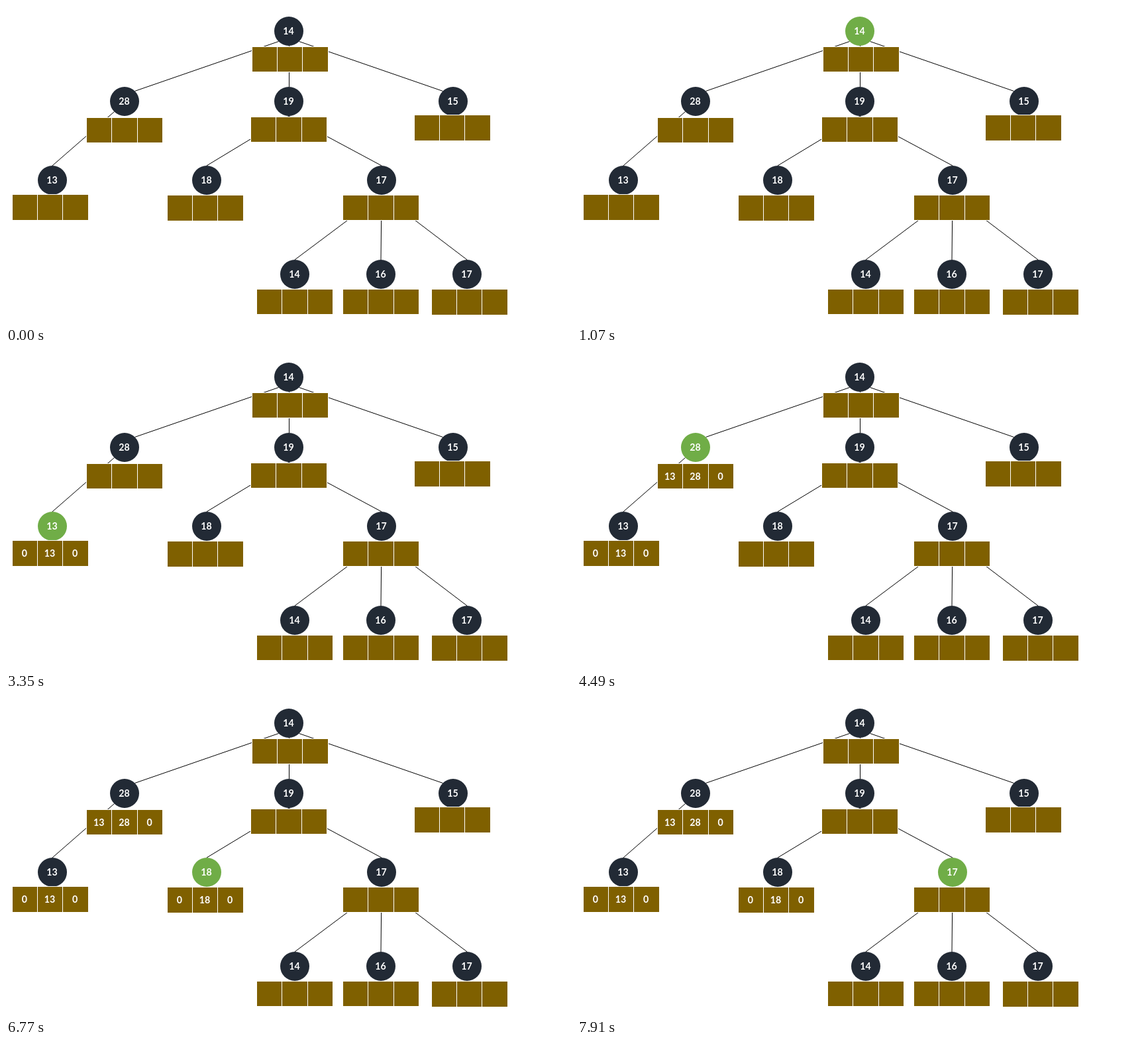
Animation of 853 by 480 pixels, one loop 8000 ms. Source, as an HTML page:

```html
<!DOCTYPE html>
<html lang="en">
<head>
<meta charset="utf-8">
<title>Tree traversal</title>
<style>
  html, body { margin: 0; width: 100%; height: 100%; overflow: hidden; background: #fff; }
  svg { display: block; width: 853px; height: 480px; }
  text { font: bold 14.2px Lato, Carlito, sans-serif; fill: #fff; text-anchor: middle; }
</style>
</head>
<body>
<svg id="stage" viewBox="0 0 853 480"></svg>
<script>
const DARK = '#222a35', GREEN = '#70ad47', GOLD = '#7f6000';
const LOOP = 8000, FIRST_STEP = 1070, STEP = 1140;
const RADIUS = 22, CELL = 38.35, BOX_HEIGHT = 37.5;
const LEVEL_Y = [38, 144, 263, 405];
const TOP = -90, BOTTOM = 90, LOWER_LEFT = 135, LOWER_RIGHT = 45;
const stage = document.getElementById('stage');

// x is the circle's centre; boxX and boxY are the corner of its three cells.
const node = (label, x, boxX, boxY, ...children) => ({ label, x, boxX, boxY, children });

const root = node(14, 427, 372, 62,
  node(28, 179, 122.5, 169,
    node(13, 70, 10, 285.5)),
  node(19, 427, 370.5, 168,
    node(18, 303, 244, 286.5),
    node(17, 567, 509.5, 286,
      node(14, 436, 379.5, 428),
      node(16, 566, 509.5, 428),
      node(17, 696, 643, 428.5))),
  node(15, 675, 617, 165.5));

function add(tag, attrs, content = '') {
  const el = document.createElementNS('http://www.w3.org/2000/svg', tag);
  for (const key in attrs) el.setAttribute(key, attrs[key]);
  el.textContent = content;
  return stage.appendChild(el);
}

function rim(n, degrees) {
  const angle = degrees * Math.PI / 180;
  return [n.x + RADIUS * Math.cos(angle), n.y + RADIUS * Math.sin(angle)];
}

// Wide branches leave the circle diagonally; the root's also arrive diagonally.
function drawEdge(parent, child) {
  const side = Math.sign(child.x - parent.x);
  const diagonal = side && (parent === root || parent.children.length === 1);
  const from = !diagonal ? BOTTOM : side < 0 ? LOWER_LEFT : LOWER_RIGHT;
  const to = diagonal && parent === root ? from - 180 : TOP;
  // Opposite corners face each other once mirrored to the upper half.
  const end = to === TOP ? TOP : side < 0 ? -LOWER_RIGHT : -LOWER_LEFT;
  const shift = side ? 0 : 0.5;
  const [x1, y1] = rim(parent, from), [x2, y2] = rim(child, end);
  add('line', { x1: x1 + shift, y1, x2: x2 + shift, y2, stroke: '#000' });
}

function drawEdges(n, level = 0) {
  n.y = LEVEL_Y[level];
  for (const child of n.children) {
    drawEdges(child, level + 1);
    drawEdge(n, child);
  }
}

// Cell borders snap to whole pixels.
function drawNode(n) {
  n.circle = add('circle', { cx: n.x, cy: n.y, r: RADIUS });
  add('text', { x: n.x - 0.5, y: n.y + 5 }, n.label);
  const border = i => Math.floor(n.boxX - 1 + i * CELL) + 0.5;
  const top = Math.floor(n.boxY) - 0.5;
  const height = Math.floor(n.boxY + BOX_HEIGHT) + 0.5 - top;
  for (let i = 0; i < 3; i++)
    add('rect', {
      x: border(i), y: top, width: border(i + 1) - border(i), height,
      fill: GOLD, stroke: '#fff'
    });
  n.children.forEach(drawNode);
}

// Each node is highlighted on entry, and again once its children are done.
const steps = [{}];
function traverse(n) {
  if (n.children.length) steps.push({ node: n });
  n.children.forEach(traverse);
  const [left, right] = n.children;
  steps.push({ node: n, values: [left ? left.label : 0, n.label, right ? right.label : 0] });
}

drawEdges(root);
drawNode(root);
traverse(root);
steps.length = Math.ceil((LOOP - FIRST_STEP) / STEP) + 1;
for (const step of steps)
  step.texts = (step.values || []).map((value, i) =>
    add('text', { x: step.node.boxX + 17.8 + i * 38.2, y: step.node.boxY + 23.6 }, value));

function draw(time) {
  const current = Math.max(0, 1 + Math.floor((time % LOOP - FIRST_STEP) / STEP));
  steps.forEach((step, i) => {
    if (step.node) step.node.circle.setAttribute('fill', DARK);
    for (const text of step.texts)
      text.setAttribute('visibility', i <= current ? 'visible' : 'hidden');
  });
  const active = steps[current].node;
  if (active) active.circle.setAttribute('fill', GREEN);
}

for (const circle of stage.querySelectorAll('circle')) circle.setAttribute('fill', DARK);
const start = performance.now();
function tick() {
  draw(performance.now() - start);
  requestAnimationFrame(tick);
}
draw(0);
requestAnimationFrame(tick);
</script>
</body>
</html>
```
